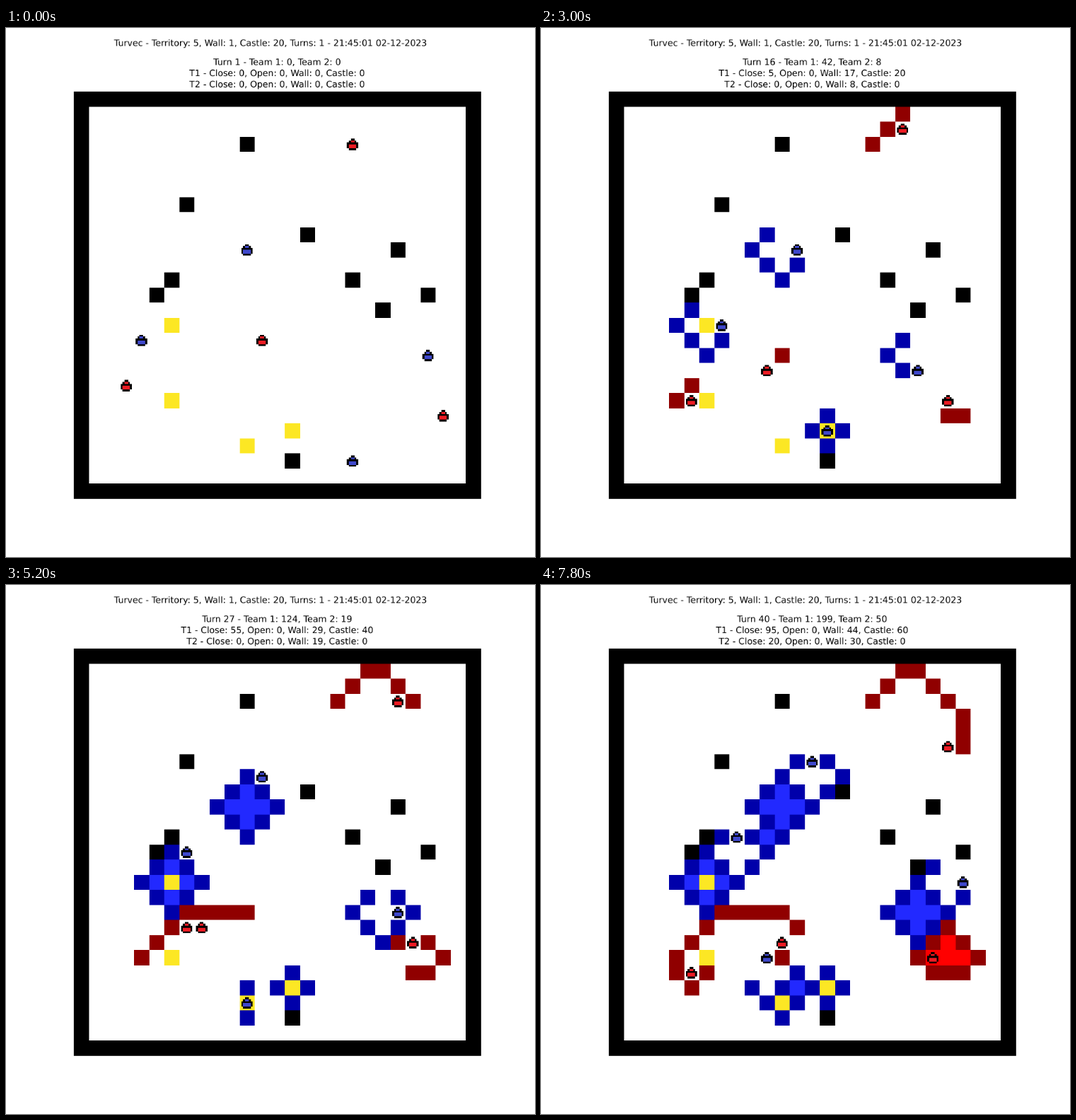
An HTML page with a canvas for the animation above (8 s loop, 748x748 px).

```html
<!DOCTYPE html>
<html lang="en">
<head>
<meta charset="utf-8">
<title>Territory game replay</title>
<style>
  html, body { margin: 0; width: 100%; height: 100%; overflow: hidden; background: #fff; }
  canvas { display: block; }
</style>
</head>
<body>
<canvas id="stage" width="748" height="748"></canvas>
<script>
const TURN_MS = 200, TURNS = 40;
const FIGURE = 1000, STAGE = 748;
const SIZE = 27, CELL = 770 / SIZE, LEFT = 128, TOP = 120;
const POINTS = { territory: 5, castle: 20 };

const blocks = [[11, 3], [7, 7], [15, 9], [21, 10], [6, 12], [18, 12], [5, 13], [23, 13], [20, 14], [14, 24]];
const castles = [[6, 15], [6, 20], [14, 22], [11, 23]];

// Scripts: digits move as on a numeric keypad, u/d/l/r build a wall, a dot waits.
const teams = [
  {
    firstTurn: 2, wall: '#0000aa', land: '#2229ff', body: '#3f48cc',
    agents: [
      [11, 10, '4udl3dr9ur7u9u66dur7'],
      [4, 16, '9udl3dr9ur7u9u66dur7'],
      [23, 17, '4444udl3dr9ur7u9u66d'],
      [18, 24, '7744udlr441udlr7l9r7']
    ]
  },
  {
    firstTurn: 3, wall: '#900000', land: '#ff0000', body: '#ed1c24',
    agents: [
      [18, 3, '.ul9u...6ur3r3r2r2r'],
      [12, 16, '.12u4...u4u4u666r2d'],
      [3, 19, '.36ul...9u68u112ldr'],
      [24, 21, '.7d4d...6ur7lu1l91d']
    ]
  }
];
const sides = { u: [0, -1], d: [0, 1], l: [-1, 0], r: [1, 0] };

const sprite = ['..##..', '.#oo#.', '######', '#oooo#', '#oooo#', '.####.'];

// The figure is drawn on whole pixels, then scaled down to the stage.
const stage = document.getElementById('stage').getContext('2d');
const figure = document.createElement('canvas');
figure.width = figure.height = FIGURE;
const ctx = figure.getContext('2d');

const index = (x, y) => y * SIZE + x;
const position = i => [i % SIZE, Math.floor(i / SIZE)];

// Cells that cannot be reached from the rim without crossing a wall.
function enclosed(walls) {
  const open = new Set([0]);
  for (const i of open) {
    const [x, y] = position(i);
    for (const [dx, dy] of Object.values(sides)) {
      const nx = x + dx, ny = y + dy;
      const inside = nx >= 0 && ny >= 0 && nx < SIZE && ny < SIZE;
      if (inside && !walls.has(index(nx, ny))) open.add(index(nx, ny));
    }
  }
  return [...Array(SIZE * SIZE).keys()].filter(i => !open.has(i) && !walls.has(i));
}

function stateAt(turn, team) {
  const actions = Math.max(0, Math.floor((turn - team.firstTurn) / 2) + 1);
  const walls = new Set();
  const agents = team.agents.map(([x, y, script]) => {
    for (const action of script.slice(0, actions)) {
      if (action in sides) {
        const [dx, dy] = sides[action];
        walls.add(index(x + dx, y + dy));
      } else if (action !== '.') {
        x += (action - 1) % 3 - 1;
        y += 1 - Math.floor((action - 1) / 3);
      }
    }
    return [x, y];
  });
  const land = enclosed(walls);
  const close = land.length * POINTS.territory;
  const castle = castles.filter(([x, y]) => land.includes(index(x, y))).length * POINTS.castle;
  return { walls, agents, land, close, castle, total: close + walls.size + castle };
}

function fillBox(left, top, size, color) {
  const x = Math.round(left), y = Math.round(top);
  ctx.fillStyle = color;
  ctx.fillRect(x, y, Math.round(left + size) - x, Math.round(top + size) - y);
}

function fillCells(x, y, color, span = 1) {
  fillBox(LEFT + x * CELL, TOP + y * CELL, span * CELL, color);
}

function drawAgent([x, y], color) {
  const dot = CELL / 8;
  const left = LEFT - 0.5 + x * CELL + dot, top = TOP + y * CELL + dot;
  sprite.forEach((row, r) => [...row].forEach((mark, c) => {
    if (mark !== '.') fillBox(left + c * dot, top + r * dot, dot, mark === '#' ? '#000' : color);
  }));
}

function drawText(text, x, baseline) {
  ctx.fillStyle = '#000';
  ctx.fillText(text, x, baseline);
}

function draw(turn) {
  const states = teams.map(team => stateAt(turn, team));
  ctx.fillStyle = '#fff';
  ctx.fillRect(0, 0, FIGURE, FIGURE);
  ctx.font = '16.667px "DejaVu Sans", sans-serif';
  ctx.textAlign = 'center';
  ctx.textRendering = 'geometricPrecision';

  drawText('Turvec - Territory: 5, Wall: 1, Castle: 20, Turns: 1 - 21:45:01 02-12-2023', 500, 34);
  drawText(`Turn ${turn} - Team 1: ${states[0].total}, Team 2: ${states[1].total}`, 512.5, 70);
  states.forEach((s, i) => drawText(
    `T${i + 1} - Close: ${s.close}, Open: 0, Wall: ${s.walls.size}, Castle: ${s.castle}`, 512.5, 91 + i * 21));

  fillCells(0, 0, '#000', SIZE);
  fillCells(1, 1, '#fff', SIZE - 2);
  states.forEach((s, i) => {
    s.land.forEach(cell => fillCells(...position(cell), teams[i].land));
    s.walls.forEach(cell => fillCells(...position(cell), teams[i].wall));
  });
  blocks.forEach(cell => fillCells(...cell, '#000'));
  castles.forEach(cell => fillCells(...cell, '#fce724'));
  states.forEach((s, i) => s.agents.forEach(agent => drawAgent(agent, teams[i].body)));

  stage.drawImage(figure, 0, 0, STAGE, STAGE);
}

const start = performance.now();
let shownTurn = 0;
function frame() {
  const elapsed = performance.now() - start;
  const turn = Math.floor(elapsed / TURN_MS) % TURNS + 1;
  if (turn !== shownTurn) draw(shownTurn = turn);
  requestAnimationFrame(frame);
}
frame();
</script>
</body>
</html>
```
